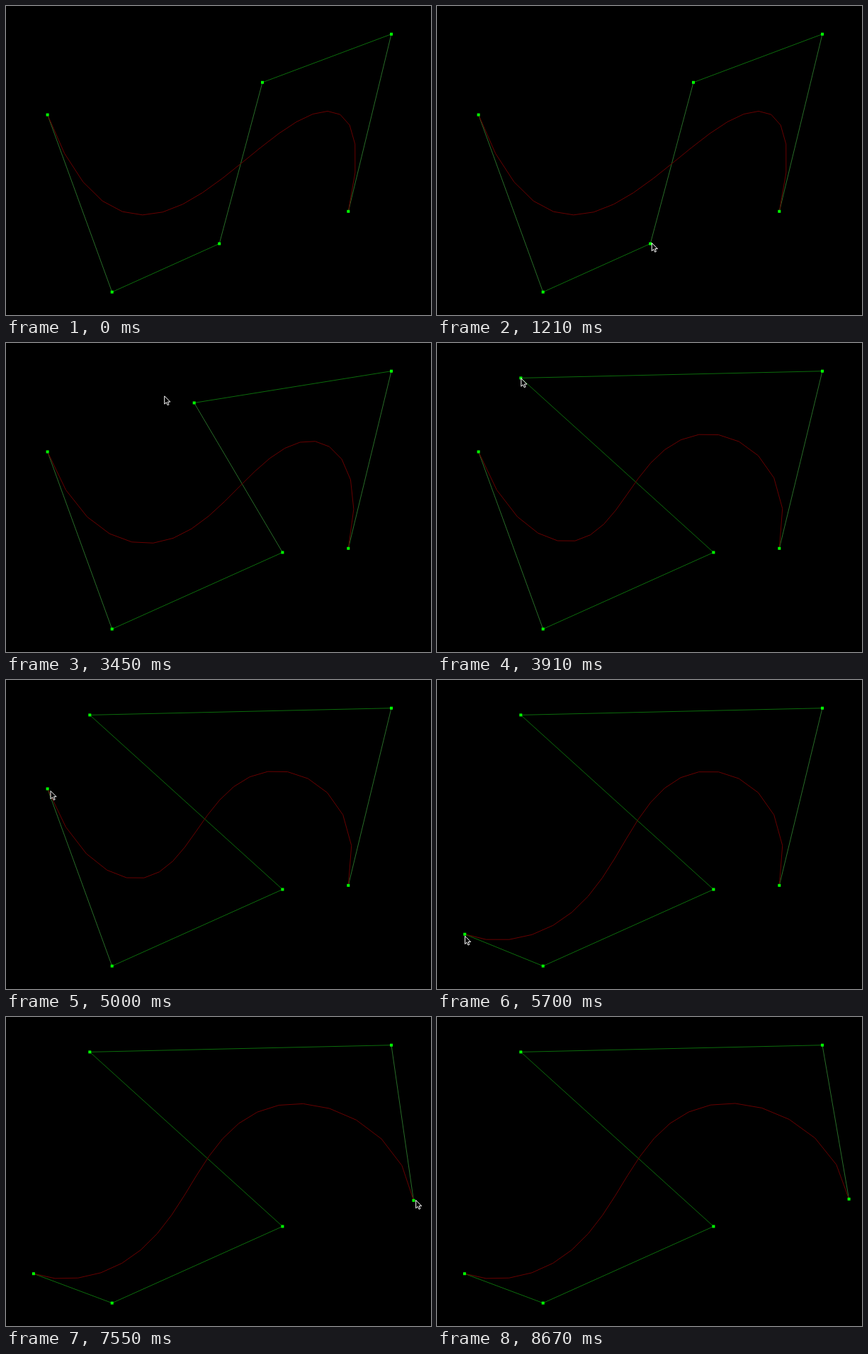
These frames come from a looping animation (600x436 px, 9.88 s). An HTML page with a canvas:

```html
<!DOCTYPE html>
<html>
<head>
<meta charset="utf-8">
<title>Bezier control points</title>
<style>
html, body { margin: 0; width: 600px; height: 436px; overflow: hidden; background: #000; }
canvas { display: block; }
</style>
</head>
<body>
<canvas id="stage" width="600" height="436"></canvas>
<script>
const ctx = document.getElementById('stage').getContext('2d');
const LOOP = 9880, LAG = 30, SEGMENTS = 20;
const SHOW = 450, HIDE = 8670;

const START = [[58.6, 153.5], [149.7, 403.6], [301.2, 335.4], [362, 107.8], [544, 39.7], [483.3, 289.8]];
const ENTRY = [293, 336];

// Pointer moves; a move with "held" drags that control point along
const MOVES = [
  { from: 450, end: 790, to: [302.5, 334] },
  { from: 1190, end: 1700, to: [390.4, 295.5], held: 2 },
  { from: 2030, end: 2180, to: [377, 156] },
  { from: 2180, end: 3000, to: [362.5, 107.5] },
  { from: 3270, end: 4000, to: [118.3, 49.4], held: 3 },
  { from: 4610, end: 5000, to: [62.5, 156] },
  { from: 5000, end: 5120, to: [59, 153.5] },
  { from: 5450, end: 5860, to: [38.9, 362.2], held: 0 },
  { from: 6240, end: 6430, to: [503, 273] },
  { from: 6580, end: 7030, to: [483, 288] },
  { from: 7270, end: 7860, to: [581.6, 256.9], held: 5 },
  { from: 8610, end: 8640, to: [589, 249.5] }
];

const mix = (a, b, u) => a.map((v, i) => v + (b[i] - v) * u);

// A hand's motion: quick start, long settling
function ease(p) {
  return p >= 1 ? 1 : 1 / (1 + (0.3 * (1 - p) / p) ** 3);
}

function pointer(t) {
  return MOVES.filter(m => t > m.from).reduce(
    (pos, m) => mix(pos, m.to, ease((t - m.from) / (m.end - m.from))), ENTRY);
}

function bezier(points, u) {
  while (points.length > 1) {
    points = points.slice(1).map((p, i) => mix(points[i], p, u));
  }
  return points[0];
}

function line(points, color) {
  ctx.strokeStyle = color;
  ctx.beginPath();
  points.forEach(p => ctx.lineTo(...p));
  ctx.stroke();
}

const arrow = new Path2D('M.5 .5V11.8L3.1 9.4L4.9 13.3L6.7 12.5L5 8.7H8.6Z');

function drawPointer([x, y]) {
  ctx.save();
  ctx.translate(x, y);
  ctx.fillStyle = '#000';
  ctx.strokeStyle = '#fff';
  ctx.fill(arrow);
  ctx.stroke(arrow);
  ctx.restore();
}

function draw(now) {
  const t = now % LOOP;
  const points = START.slice();
  for (const { from, end, held } of MOVES) {
    if (held !== undefined && t - LAG > from) points[held] = pointer(Math.min(t - LAG, end));
  }

  ctx.fillStyle = '#000';
  ctx.fillRect(0, 0, 600, 436);
  ctx.lineWidth = 1;
  points.slice(1).forEach((p, i) => {
    const q = points[i];
    const steep = Math.abs(p[1] - q[1]) > Math.abs(p[0] - q[0]);
    line([q, p], steep ? '#286c28' : '#0c6c0c');
  });
  line(Array.from({ length: SEGMENTS + 1 }, (_, i) => bezier(points, i / SEGMENTS)), '#680000');
  ctx.fillStyle = '#0f0';
  points.forEach(([x, y]) => ctx.fillRect(x - 2, y - 2, 4, 4));
  if (t >= SHOW && t < HIDE) drawPointer(pointer(t));
}

const begin = performance.now();
function tick() {
  draw(performance.now() - begin);
  requestAnimationFrame(tick);
}
tick();
</script>
</body>
</html>
```
